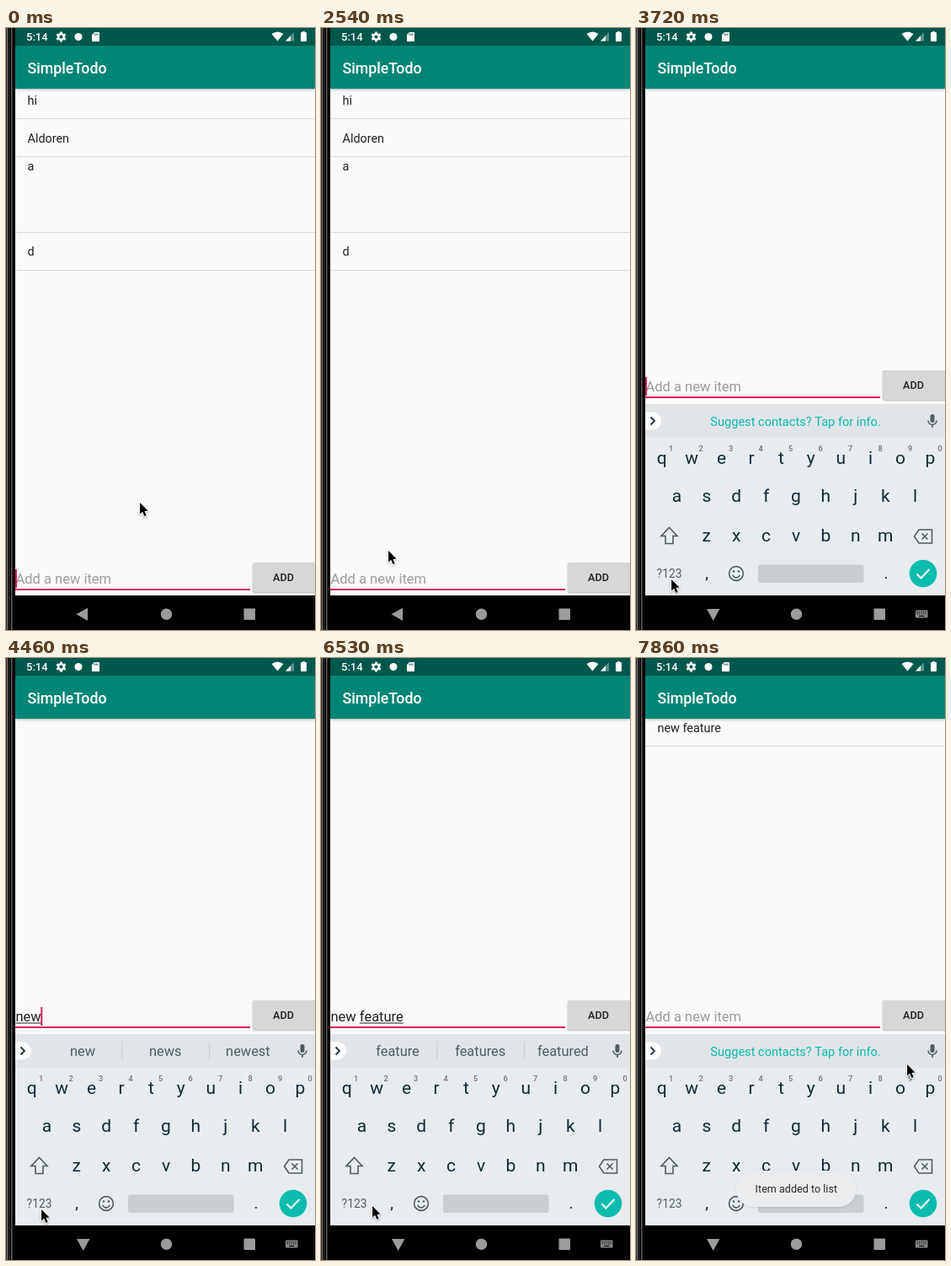
Animation, 367 px wide and 714 px high, one loop 8 s. Source, as an HTML page with a canvas:

```html
<!DOCTYPE html>
<html lang="en">
<head>
<meta charset="utf-8">
<title>Todo list</title>
<style>
  html, body { margin: 0; width: 100%; height: 100%; overflow: hidden; background: #000; }
  canvas { display: block; width: 367px; height: 714px; }
</style>
</head>
<body>
<canvas id="stage"></canvas>
<script>
const W = 367, H = 714, LOOP = 8000;
const canvas = document.getElementById('stage');
const ctx = canvas.getContext('2d');
const dpr = window.devicePixelRatio || 1;
canvas.width = W * dpr;
canvas.height = H * dpr;

const ACCENT = '#d81b60', TEAL = '#0bbcad', INK = '#0f2a33', ICON = '#4f5c63';

// Timelines: [start ms, value]; each value holds until the next one.
const POINTER = [
  [0, [158.5, 562]], [2390, [122, 588]], [2540, [79.5, 619]], [2690, [57, 637]],
  [2830, [48, 645]], [3120, [41.5, 653]], [6530, [60.5, 649]], [6680, [130, 592]],
  [6830, [236, 498]], [6980, [306, 438]], [7130, [320, 426]],
  [7710, [321, 455]], [7860, [321.5, 481]]
];
const CARET = [
  [0, 1], [150, 0], [600, 1], [1050, 0], [1650, 1], [2090, 0], [2690, 1], [3120, 0],
  [3570, 1], [6530, 0], [6980, 1], [7710, 0]
];
const TYPED = [
  [0, ''], [4160, 'n'], [4310, 'ne'], [4460, 'new'], [4610, 'new '], [4910, 'new f'],
  [5060, 'new fe'], [5200, 'new fea'], [5350, 'new feat'], [5500, 'new featu'],
  [5800, 'new featur'], [5950, 'new feature'], [7270, '']
];
const HINTS = [
  [0, ''], [4160, 'n no new'], [4310, 'ne new need'], [4460, 'new news newest'],
  [4610, 'year one house'], [4910, 'f for from'], [5060, 'fe few feel'],
  [5200, 'fea feature features'], [5800, 'feature features featured'], [7270, '']
];
const KEYBOARD = [[0, 0], [3570, 0.6], [3720, 1]];
const TOAST = [[0, 0], [7420, 0.5], [7570, 1]];

function at(track, t) {
  let value = track[0][1];
  for (const [start, v] of track) if (t >= start) value = v;
  return value;
}

function rect(x, y, w, h, fill) {
  ctx.fillStyle = fill;
  ctx.fillRect(x, y, w, h);
}

function round(x, y, w, h, r, fill) {
  ctx.fillStyle = fill;
  ctx.beginPath();
  ctx.roundRect(x, y, w, h, r);
  ctx.fill();
}

function disc(x, y, r, fill) {
  ctx.fillStyle = fill;
  ctx.beginPath();
  ctx.arc(x, y, r, 0, Math.PI * 2);
  ctx.fill();
}

function trace(points, closed) {
  ctx.beginPath();
  points.forEach(([x, y]) => ctx.lineTo(x, y));
  if (closed) ctx.closePath();
}

function poly(points, fill) {
  trace(points, true);
  ctx.fillStyle = fill;
  ctx.fill();
}

function line(points, color, width, closed) {
  trace(points, closed);
  ctx.strokeStyle = color;
  ctx.lineWidth = width;
  ctx.stroke();
}

function text(str, x, y, size, color, align = 'left', weight = 400) {
  ctx.font = `${weight} ${size}px Roboto, sans-serif`;
  ctx.textAlign = align;
  ctx.fillStyle = color;
  ctx.fillText(str, x, y);
}

function shadow(color, blur, dy) {
  ctx.shadowColor = color;
  ctx.shadowBlur = blur * dpr;
  ctx.shadowOffsetY = dy * dpr;
}

const noShadow = () => shadow('transparent', 0, 0);

function drawBezel() {
  rect(0, 0, 11, H, '#000');
  rect(0, 0, 1, H, '#2a2a2a');
  rect(1, 0, 1, H, '#777');
  rect(2, 0, 3, H, '#1a1a1a');
  rect(6, 0, 1, H, '#606060');
  rect(7, 0, 1, H, '#303030');
}

function drawStatusBar() {
  rect(11, 0, 356, 21, '#00574b');
  text('5:14', 24, 15, 13, '#fff', 'left', 500);

  for (let i = 0; i < 6; i++) {
    const a = i * Math.PI / 3 + Math.PI / 6, c = Math.cos(a), s = Math.sin(a);
    line([[65.5 + 3 * c, 10.5 + 3 * s], [65.5 + 6 * c, 10.5 + 6 * s]], '#fff', 2.8);
  }
  disc(65.5, 10.5, 4.6, '#fff');
  disc(65.5, 10.5, 2, '#00574b');

  disc(86, 10.5, 4.5, '#fff');

  poly([[105, 5], [111, 5], [111, 16], [102, 16], [102, 8]], '#fff');
  for (let i = 0; i < 3; i++) rect(104.5 + i * 2, 6.5, 1, 2.2, '#00574b');

  ctx.fillStyle = '#fff';
  ctx.beginPath();
  ctx.moveTo(322.5, 15.5);
  ctx.lineTo(315.5, 7);
  ctx.quadraticCurveTo(322.5, 2, 329.5, 7);
  ctx.fill();

  poly([[342, 5], [342, 15.5], [332, 15.5]], 'rgba(255,255,255,.35)');
  poly([[338, 9.2], [338, 15.5], [332, 15.5]], '#fff');
  round(350, 5, 7, 11, 1, '#fff');
  rect(352, 4, 3, 1.5, '#fff');
}

function drawToolbar() {
  shadow('rgba(0,0,0,.3)', 3, 1);
  rect(11, 21, 356, 51, '#008577');
  noShadow();
  text('SimpleTodo', 25.5, 54, 17.8, '#fff', 'left', 500);
}

function drawItem(label, baseline, divider) {
  text(label, 25.5, baseline, 14.4, '#212121');
  rect(11, divider, 356, 1, '#dadada');
}

function drawList(open, added) {
  if (!open) {
    drawItem('hi', 91, 107);
    drawItem('Aldoren', 136, 152);
    drawItem('a', 168.5, 242);
    drawItem('d', 270, 287);
  } else if (added) {
    drawItem('new feature', 87.5, 104);
  }
}

function drawInput(t, dy) {
  const typed = at(TYPED, t), size = 16.5;
  ctx.save();
  ctx.translate(0, dy);
  if (typed) {
    text(typed, 11.5, 659, size, '#212121');
  } else {
    const touched = t >= 3420 && t < 3570;
    text('Add a new item', 11.5, 659, size, touched ? '#6e6e6e' : '#9c9c9c');
  }
  const end = 11.5 + ctx.measureText(typed).width;
  if (typed && !typed.endsWith(' ')) {
    const start = 11.5 + ctx.measureText(typed.slice(0, typed.lastIndexOf(' ') + 1)).width;
    rect(start, 660.5, end - start, 1, '#212121');
  }
  rect(11, 665, 279, 2, ACCENT);
  if (at(CARET, t)) rect(typed ? end - 0.5 : 11, 642, 2, 22, ACCENT);

  shadow('rgba(0,0,0,.28)', 2, 1);
  round(293, 634, 76, 35, 2, t >= 7130 && t < 7270 ? '#c3c4c4' : '#d6d7d7');
  noShadow();
  text('ADD', 329.5, 656, 12.6, '#212121', 'center', 500);
  ctx.restore();
}

function drawStrip(words) {
  rect(11, 446, 356, 40, '#e1e5e8');
  round(11, 455.5, 19, 21, [0, 10.5, 10.5, 0], '#fff');
  line([[17.5, 461.5], [22, 466], [17.5, 470.5]], '#263238', 1.8);
  if (words) {
    words.split(' ').forEach((w, i) => text(w, 91 + i * 98.2, 472, 16.4, ICON, 'center'));
    rect(137.5, 455, 1, 21, '#c6ccd0');
    rect(241, 455, 1, 21, '#c6ccd0');
  } else {
    text('Suggest contacts? Tap for info.', 189.5, 471.5, 14.6, TEAL, 'center');
  }

  round(349.5, 458, 5, 10, 2.5, ICON);
  ctx.strokeStyle = ICON;
  ctx.lineWidth = 1.5;
  ctx.beginPath();
  ctx.arc(352, 465.5, 5, 0, Math.PI);
  ctx.stroke();
  rect(351.2, 470, 1.6, 4, ICON);
}

function drawKeyRow(keys, x, baseline) {
  [...keys].forEach((k, i) => text(k, x + i * 35.4, baseline, 21, INK, 'center'));
}

function drawKeyIcons() {
  line([[39.5, 592.5], [49, 602.5], [44, 602.5], [44, 611.5], [35, 611.5], [35, 602.5], [30, 602.5]],
    ICON, 1.6, true);
  line([[336, 595], [351.5, 595], [351.5, 611], [336, 611], [330.5, 603]], ICON, 1.6, true);
  line([[339.5, 599.5], [346.5, 606.5]], ICON, 1.6);
  line([[346.5, 599.5], [339.5, 606.5]], ICON, 1.6);

  ctx.strokeStyle = ICON;
  ctx.lineWidth = 1.6;
  ctx.beginPath();
  ctx.arc(119, 647, 8.4, 0, Math.PI * 2);
  ctx.stroke();
  disc(116, 644.5, 1.3, ICON);
  disc(122, 644.5, 1.3, ICON);
  ctx.beginPath();
  ctx.arc(119, 647.5, 4.4, 0.3, Math.PI - 0.3);
  ctx.stroke();

  disc(341, 647, 16.3, TEAL);
  line([[333.5, 647.5], [338.5, 652.5], [348.5, 642]], '#fff', 2);
}

function drawKeyboard(shown, words) {
  ctx.save();
  ctx.beginPath();
  ctx.rect(11, 446, 356, 227);
  ctx.clip();
  ctx.translate(0, (1 - shown) * 227);
  rect(11, 446, 356, 227, '#e8ecef');
  drawStrip(words);
  drawKeyRow('qwertyuiop', 30.8, 516.5);
  [...'1234567890'].forEach((d, i) =>
    text(d, 41.5 + i * 35.5, 501.5, 9.2, '#6a767c', 'center', 500));
  drawKeyRow('asdfghjkl', 48.4, 562);
  drawKeyRow('zxcvbnm', 83.8, 608.5);
  text('?123', 39.5, 652, 13.8, ICON, 'center');
  text(',', 84, 653, 19, INK, 'center');
  text('.', 297, 653, 19, INK, 'center');
  round(145, 636.5, 125.5, 21.5, 3, '#c9ced2');
  drawKeyIcons();
  ctx.restore();
}

function drawNavBar(open) {
  const gray = '#9b9b9b';
  rect(11, 673, 356, 41, '#000');
  if (open) {
    poly([[84, 689], [99.5, 689], [91.7, 703]], gray);
    round(332, 690.5, 14.5, 9, 1, '#8a8a8a');
    for (let r = 0; r < 2; r++)
      for (let c = 0; c < 5; c++) rect(333.6 + c * 2.5, 692 + r * 2.3, 1.2, 1.2, '#000');
    rect(336, 697, 6.5, 1, '#000');
  } else {
    poly([[83.5, 695.3], [97, 687.7], [97, 703]], gray);
  }
  disc(190.5, 695.3, 6.7, gray);
  round(282.5, 688.5, 13.5, 13.5, 0.8, gray);
}

function drawToast(alpha) {
  if (!alpha) return;
  ctx.save();
  ctx.globalAlpha = alpha;
  shadow('rgba(0,0,0,.1)', 3, 1);
  round(118.5, 608, 143.5, 43, 21.5, '#ebecee');
  noShadow();
  text('Item added to list', 190.3, 634, 12.6, '#2b2b2b', 'center');
  ctx.restore();
}

function drawPointer([x, y]) {
  ctx.save();
  ctx.translate(x, y);
  ctx.lineJoin = 'round';
  const arrow = [[0.6, 1], [0.6, 14.5], [3.7, 11.7], [5.9, 17], [8.2, 16], [6, 10.9], [10, 10.6]];
  shadow('rgba(0,0,0,.3)', 2, 1);
  line(arrow, '#fff', 2, true);
  noShadow();
  poly(arrow, '#000');
  ctx.restore();
}

function draw(t) {
  const shown = at(KEYBOARD, t), open = shown > 0;
  ctx.setTransform(dpr, 0, 0, dpr, 0, 0);
  rect(0, 0, W, H, '#fafafa');
  drawList(open, t >= 7270);
  drawToolbar();
  drawStatusBar();
  drawInput(t, open ? -228 : 0);
  if (open) drawKeyboard(shown, at(HINTS, t));
  drawNavBar(open);
  drawToast(at(TOAST, t));
  drawBezel();
  drawPointer(at(POINTER, t));
}

function tick() {
  draw(performance.now() % LOOP);
  requestAnimationFrame(tick);
}
tick();
</script>
</body>
</html>
```
